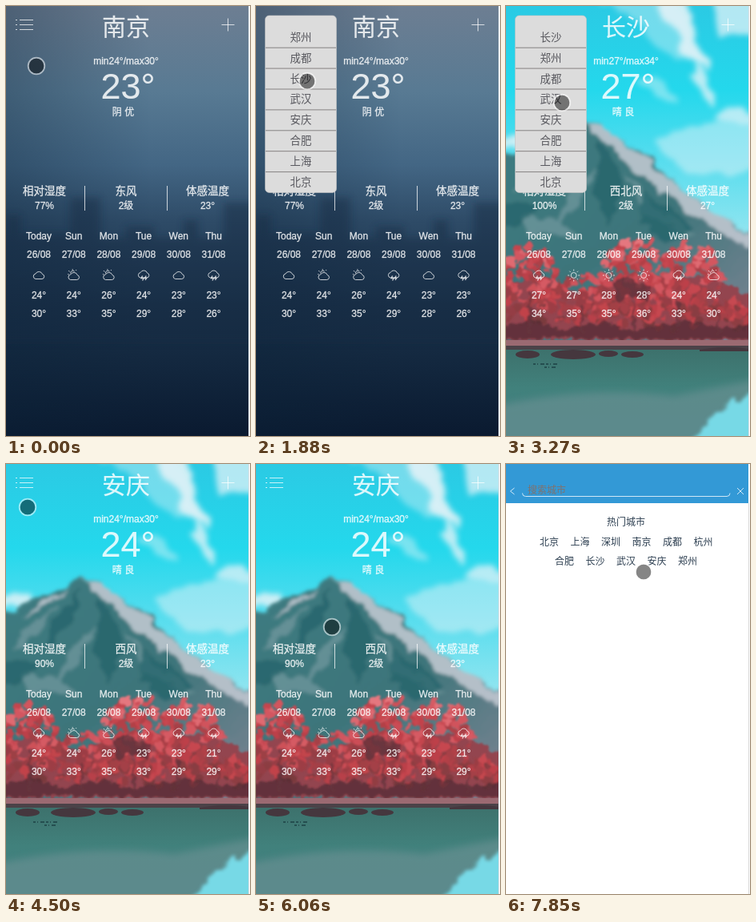
An HTML page that plays this animation: 305x538 px, repeating every 8000 ms.

```html
<!DOCTYPE html>
<html lang="zh">
<head>
<meta charset="utf-8">
<title>Weather</title>
<style>
html, body { margin: 0; width: 100%; height: 100%; overflow: hidden; background: #fff; }
svg { position: absolute; left: 0; top: 0; }
text { font-family: "Liberation Sans", "Noto Sans CJK SC", "Noto Sans CJK", sans-serif; text-anchor: middle; }
#ui text { fill: #fff; fill-opacity: .84; stroke: #fff; stroke-opacity: .6; stroke-width: .4px; }
#ui text.big { stroke-width: .2px; }
#ui path { fill: none; stroke: #fff; stroke-opacity: .75; }
#menu text { fill: #59595f; }
#search text { fill: #2c3e50; }
#search text.hint { fill: #80716c; text-anchor: start; }
#cursor { will-change: transform; }
</style>
</head>
<body>
<svg id="back" width="305" height="538" viewBox="0 0 305 538">
  <defs>
    <linearGradient id="dusk" x2="0" y2="1">
      <stop offset="0" stop-color="#6d7e92"/><stop offset=".2" stop-color="#587a93"/>
      <stop offset=".37" stop-color="#436684"/><stop offset=".5" stop-color="#2e4b67"/>
      <stop offset=".7" stop-color="#1a324a"/><stop offset="1" stop-color="#0a1a30"/>
    </linearGradient>
    <linearGradient id="shade" x2="1" y2="0">
      <stop offset="0" stop-color="#0b2238" stop-opacity=".32"/><stop offset=".6" stop-color="#0b2238" stop-opacity="0"/>
    </linearGradient>
    <linearGradient id="sky" x2="0" y2="1">
      <stop offset="0" stop-color="#2bcae4"/><stop offset=".35" stop-color="#24d8ec"/>
      <stop offset=".6" stop-color="#4fdcee"/><stop offset="1" stop-color="#9ae6f0"/>
    </linearGradient>
    <linearGradient id="slope" x2="1" y2="1">
      <stop offset="0" stop-color="#3f7c82"/><stop offset=".5" stop-color="#3c757a"/><stop offset="1" stop-color="#8a8798"/>
    </linearGradient>
    <linearGradient id="lake" x2="0" y2="1">
      <stop offset="0" stop-color="#3d716c"/><stop offset=".45" stop-color="#41817c"/><stop offset="1" stop-color="#427f82"/>
    </linearGradient>
    <linearGradient id="night" x2="0" y2="1">
      <stop offset="0" stop-color="#45508f"/><stop offset=".14" stop-color="#28285f"/>
      <stop offset=".34" stop-color="#2a2760"/><stop offset=".42" stop-color="#594a76"/>
      <stop offset=".52" stop-color="#2a2350"/><stop offset=".62" stop-color="#4c4474"/>
      <stop offset=".75" stop-color="#385a90"/><stop offset=".9" stop-color="#357a9c"/>
      <stop offset="1" stop-color="#58a7aa"/>
    </linearGradient>
    <filter id="soft" x="-30%" y="-30%" width="160%" height="160%"><feGaussianBlur stdDeviation="5"/></filter>
    <filter id="rough" x="-20%" y="-20%" width="140%" height="140%">
      <feTurbulence type="fractalNoise" baseFrequency=".05" numOctaves="3" seed="4"/>
      <feDisplacementMap in="SourceGraphic" scale="18" xChannelSelector="R" yChannelSelector="G"/>
      <feGaussianBlur stdDeviation="2"/>
    </filter>
    <filter id="leafy" x="-20%" y="-20%" width="140%" height="140%">
      <feTurbulence type="fractalNoise" baseFrequency=".1" numOctaves="2" seed="2"/>
      <feDisplacementMap in="SourceGraphic" scale="12" xChannelSelector="R" yChannelSelector="G"/>
      <feGaussianBlur stdDeviation="1.2"/>
    </filter>
    <filter id="wisp" x="-30%" y="-30%" width="160%" height="160%">
      <feTurbulence type="fractalNoise" baseFrequency=".03" numOctaves="3" seed="9"/>
      <feDisplacementMap in="SourceGraphic" scale="26" xChannelSelector="R" yChannelSelector="G"/>
      <feGaussianBlur stdDeviation="3.5"/>
    </filter>
    <filter id="cloudy" x="-30%" y="-30%" width="160%" height="160%">
      <feTurbulence type="fractalNoise" baseFrequency=".018 .03" numOctaves="3" seed="9"/>
      <feDisplacementMap in="SourceGraphic" scale="50" xChannelSelector="R" yChannelSelector="G"/>
      <feGaussianBlur stdDeviation="4"/>
    </filter>
    <clipPath id="page"><path d="M0 0H303V538H0z"/></clipPath>
  </defs>
  <g clip-path="url(#page)">
    <g id="city">
      <path fill="url(#dusk)" d="M0 0H303V538H0z"/>
      <path fill="url(#shade)" d="M0 0H303V538H0z"/>
      <path filter="url(#soft)" fill="#132b43" opacity=".45" d="M-20 285H0V262H18V284H80V240H118V290H150V276H185V290H222V268H240V290H272V246H325V420H-20z"/>
    </g>
    <g id="hill">
      <path fill="url(#sky)" d="M0 0H303V300H0z"/>
      <g fill="#e2f2f7" filter="url(#wisp)">
        <path opacity=".4" d="M110 -20H200L250 70L205 60z"/>
        <path opacity=".9" d="M180 -20H215L235 30L258 78L232 66L205 30z"/>
        <path opacity=".75" d="M250 -20H330V55L290 30L268 42z"/>
        <ellipse cx="246" cy="97" rx="8" ry="28" opacity=".8" transform="rotate(-18 246 97)"/>
        <ellipse cx="190" cy="104" rx="28" ry="9" opacity=".45" transform="rotate(32 190 104)"/>
        <ellipse cx="290" cy="140" rx="30" ry="8" opacity=".75"/>
        <path opacity=".5" d="M190 170Q220 140 330 148V208H225z"/>
        <ellipse cx="8" cy="172" rx="34" ry="7" opacity=".85"/>
      </g>
      <g filter="url(#rough)">
        <path fill="url(#slope)" d="M-30 196L15 180L60 160L95 144L118 150L150 173L185 197L222 230L262 262L340 310V430H-30z"/>
        <g fill="#c6ccd5" opacity=".85">
          <path d="M95 146L122 152L160 182L200 212L245 250L310 294L300 302L235 262L190 226L150 196L125 170z"/>
          <path d="M80 154L50 178L20 192L52 170z"/>
        </g>
        <g fill="#7fa0a6" opacity=".6">
          <path d="M66 176L42 210L8 236L24 208z"/>
          <path d="M108 205L92 245L58 282L76 238z"/>
          <path d="M150 205L185 250L240 290L170 262z"/>
          <path d="M20 262L70 270L90 292L30 285z"/>
        </g>
        <g fill="#23636a" opacity=".75">
          <path d="M92 160L86 195L45 238L58 196z"/>
          <path d="M118 168L150 218L130 275L108 232z"/>
          <path d="M-10 245L40 252L20 275H-20z"/>
          <path d="M170 228L235 280L200 295L165 270z"/>
        </g>
      </g>
      <path fill="#93454f" filter="url(#leafy)" d="M-30 360L40 335L90 360L150 335L260 340L330 375V418H-30z"/>
      <g id="trees" filter="url(#leafy)"></g>
      <path fill="url(#lake)" d="M0 429H303V538H0z"/>
      <path fill="#9b6a72" d="M0 418H303V426H0z"/>
      <path fill="#4b4248" d="M0 425H303V430H0z"/>
      <g fill="#45373e">
        <ellipse cx="27" cy="436" rx="15" ry="5"/><ellipse cx="84" cy="436" rx="28" ry="6"/>
        <ellipse cx="128" cy="435" rx="12" ry="4"/><ellipse cx="158" cy="436" rx="14" ry="4"/>
        <path d="M242 430Q275 424 303 429V432H242z"/>
      </g>
      <path fill="#6e9294" opacity=".6" filter="url(#soft)" d="M-10 500Q100 475 210 488L325 465V500L230 545H-10z"/>
      <path fill="#77d9e6" filter="url(#rough)" d="M228 550Q255 505 325 474V550z"/>
      <path stroke="#14343a" stroke-width="1.500" stroke-dasharray="3 2 1 3 5 2" d="M34 448H66M48 452H64" opacity=".8"/>
    </g>
    <g id="sunset">
      <path fill="url(#night)" d="M0 0H303V538H0z"/>
      <g filter="url(#cloudy)">
        <path fill="#7b9ab2" opacity=".7" d="M-20 -20H60L45 15L-20 22z"/>
        <path fill="#d5c8a4" d="M190 -20H330V85L300 62L270 28L225 28z"/>
        <path fill="#8a7f99" opacity=".65" d="M95 -10H200L235 38L150 22z"/>
        <path fill="#201f55" opacity=".85" d="M-20 75Q110 45 190 70T330 110V180Q160 190 -20 165z"/>
        <path fill="#8f6276" opacity=".8" d="M50 222Q150 196 330 196V226L120 240z"/>
        <path fill="#e9c173" d="M140 232Q210 206 330 216V262H190z"/>
        <path fill="#d68e59" opacity=".8" d="M130 200L190 188L300 202L200 212z"/>
      </g>
      <path fill="#2d2450" opacity=".93" d="M0 245H28V236H50V244H82V222H90V216H97V222H108V240H113V222H150V238H170V247H188V257H208V250H216V262H242V254H250V264H260V256H276V266H303V290H0z"/>
      <g filter="url(#cloudy)">
        <path fill="#f0cd7c" d="M190 312Q250 293 330 304V362Q250 370 180 352z"/>
        <path fill="#cf956f" opacity=".65" d="M100 325L210 310V390L120 372z"/>
        <path fill="#28214f" opacity=".65" d="M70 285H160L148 375H92z"/>
        <path fill="#85809f" opacity=".6" d="M150 375H330V408H140z"/>
        <path fill="#24477e" opacity=".6" d="M-20 390L130 400L330 425V455L90 440L-20 455z"/>
        <path fill="#70afb5" opacity=".7" d="M-20 508L100 470L240 462L180 500L60 550H-20z"/>
        <ellipse cx="160" cy="487" rx="32" ry="9" fill="#a9c9b6" opacity=".75"/>
        <ellipse cx="286" cy="515" rx="42" ry="22" fill="#d3d6b0" opacity=".8"/>
      </g>
      <path fill="#72796f" d="M0 514H22L31 519L48 518L51 524L30 527L18 525H0z"/>
    </g>
  </g>
  <path fill="#d8dfe3" d="M303 0H304V538H303z"/>
</svg>

<svg id="ui" width="305" height="538" viewBox="0 0 305 538">
  <defs>
    <path id="cloud" d="M-4 4.500H4A3 3 0 0 0 4.500 -1.400A4.600 4.600 0 0 0 -4 -2A3.300 3.300 0 0 0 -4 4.500z"/>
    <g id="c"><use href="#cloud"/></g>
    <g id="p"><use href="#cloud" y="1"/><path d="M-4-2.500A3 3 0 0 1 1-5M-6-1L-7.500-1.500M-5-4.500L-6.500-6M-1.500-6.500V-8M2.500-6L3.500-7"/></g>
    <g id="r"><use href="#cloud" y="-1.500"/><path stroke-width="1.400" d="M-1.500 .5L-3 3.500H0L-1.500 6.500M3 .5L1.500 3.500H3.500L2 6"/></g>
    <g id="s"><circle r="3.500" fill="none" stroke="#fff" stroke-opacity=".75"/><path d="M0-5.500V-7.500M0 5.500V7.500M5.500 0H7.500M-5.500 0H-7.500M4-4L5.300-5.300M-4-4L-5.300-5.300M4 4L5.300 5.300M-4 4L-5.300 5.300"/></g>
  </defs>
  <path d="M12 17.500H14M17 17.500H34M12 23.500H14M17 23.500H34M12 29.500H14M17 29.500H34M269.500 23.500H285.500M277.500 15.500V31.500M98.500 225V256M201.500 225V256"/>
  <g id="info"></g>
</svg>

<svg id="menu" width="305" height="538" viewBox="0 0 305 538">
  <rect x="11.500" y="12" width="89" height="221.500" rx="5" fill="#dcdcdc" stroke="#c4c4c4" stroke-width=".6"/>
  <path id="rules" stroke="#858282"/>
  <g id="list"></g>
</svg>

<svg id="search" width="305" height="538" viewBox="0 0 305 538">
  <path fill="#fff" d="M0 0H305V538H0z"/>
  <path fill="#3399d6" d="M0 0H303V49H0z"/>
  <path fill="#d8d8d8" d="M303 49H304V538H303z"/>
  <path fill="none" stroke="#cfe8f7" d="M10.500 30L5.500 34L10.500 38M289 30L297 38M297 30L289 38M20.500 36.500Q20.500 40.500 24.500 40.500H276Q280 40.500 280 36.500"/>
  <g id="cities"></g>
</svg>

<svg id="cursor" width="24" height="24" viewBox="-12 -12 24 24">
  <circle r="9.500" fill="#000" fill-opacity=".48"/>
  <circle r="10.300" fill="none" stroke="#fff" stroke-opacity=".55" stroke-width="1.800"/>
</svg>

<script>
const $ = id => document.getElementById(id);
const label = (x, mid, s, size = 12, cls = '') =>
  `<text x="${x}" y="${mid + size * .365}" font-size="${size}" class="${cls}">${s}</text>`;
const show = (id, on) => $(id).style.display = on ? '' : 'none';

const days = ['Today', 'Sun', 'Mon', 'Tue', 'Wen', 'Thu'];
const reports = {
  南京: { bg: 'city', range: [24, 30], now: 23, sky: '阴 优', wet: 77, wind: '东风', force: 2, feel: 23,
    icons: 'cpprcr', low: [24, 24, 26, 24, 23, 23], high: [30, 33, 35, 29, 28, 26] },
  长沙: { bg: 'hill', range: [27, 34], now: 27, sky: '晴 良', wet: 100, wind: '西北风', force: 2, feel: 27,
    icons: 'rsssrp', low: [27, 27, 28, 28, 24, 24], high: [34, 35, 35, 36, 33, 30] },
  安庆: { bg: 'hill', range: [24, 30], now: 24, sky: '晴 良', wet: 90, wind: '西风', force: 2, feel: 23,
    icons: 'rpprrr', low: [24, 24, 26, 23, 23, 21], high: [30, 33, 35, 33, 29, 29] },
  上海: { bg: 'sunset', range: [27, 31], now: 28, sky: '多云 优', wet: 69, wind: '东南风', force: 1, feel: 27,
    icons: 'rcrrcs', low: [27, 27, 28, 26, 26, 24], high: [31, 33, 35, 33, 31, 30] }
};

function infoMarkup(name) {
  const r = reports[name];
  let out = label(150, 26.500, name, 30, 'big')
    + label(150, 69, `min${r.range[0]}°/max${r.range[1]}°`)
    + label(152.500, 100, r.now + '°', 45, 'big') + label(146.500, 132.500, r.sky)
    + label(48, 231, '相对湿度', 13.500) + label(48, 249.500, r.wet + '%')
    + label(150, 231, r.wind, 13.500) + label(150, 249.500, r.force + '级')
    + label(252, 231, '体感温度', 13.500) + label(252, 249.500, r.feel + '°');
  days.forEach((day, i) => {
    const x = 41 + i * 43.700;
    out += label(x, 287.500, day) + label(x, 310.500, `${26 + i}/08`)
      + `<use href="#${r.icons[i]}" x="${x}" y="337"/>`
      + label(x, 362, r.low[i] + '°') + label(x, 385, r.high[i] + '°');
  });
  return out;
}

// Seeded foliage, darker towards the ground
let seed = 7;
const rnd = () => (seed = seed * 16807 % 2147483647) / 2147483647;
let leaves = '';
for (const [cx, cy, rx, ry, n] of [[150, 388, 165, 18, 110], [30, 346, 40, 46, 120], [165, 342, 46, 50, 130], [232, 345, 38, 50, 120], [105, 365, 35, 32, 60], [288, 386, 24, 20, 40]])
  for (let i = 0; i < n; i++) {
    const a = rnd() * 6.283, d = Math.sqrt(rnd());
    const y = cy + ry * d * Math.sin(a);
    const light = 70 - (y - 290) * .17 - rnd() * 18;
    leaves += `<circle cx="${cx + rx * d * Math.cos(a)}" cy="${y}" r="${2 + rnd() * 4.500}" fill="hsl(356 ${light}% ${light}%)"/>`;
  }
$('trees').innerHTML = leaves
  + '<path fill="#5c313a" opacity=".75" d="M132 348L152 338L182 352L176 370L152 362L140 374z"/>'
  + '<path fill="#4f2c34" opacity=".7" d="M-10 402L30 392L70 404L120 396L165 405L220 394L265 402L310 398V416H-10z"/>'
  + '<path stroke="#65343d" stroke-width="3" opacity=".8" d="M30 355V410M215 365V405M160 370V408M265 375V410M95 375V408"/>';

let rules = '';
for (let i = 0; i < 7; i++) rules += `M12 ${52.200 + i * 25.900}H100`;
$('rules').setAttribute('d', rules);

const row = (names, x, y) => names.split(' ').map((s, i) => label(x + i * 38.500, y, s)).join('');
$('cities').innerHTML = label(27, 33, '搜索城市', 12, 'hint') + label(150, 73, '热门城市')
  + row('北京 上海 深圳 南京 成都 杭州', 54, 98) + row('合肥 长沙 武汉 安庆 郑州', 73, 122);

// Timeline in ms
const picks = [[0, '南京'], [2430, '长沙'], [4080, '安庆'], [6290, '上海']];
const menus = [
  [700, 2180, '郑州 成都 长沙 武汉 安庆 合肥 上海 北京'],
  [2920, 3850, '长沙 郑州 成都 武汉 安庆 合肥 上海 北京'],
  [5000, 5910, '安庆 长沙 郑州 成都 武汉 合肥 上海 北京']
];
const path = [
  [0, 38, 75], [80, 38, 75], [520, 24, 26], [720, 24, 26], [1010, 40, 52], [1180, 40, 52], [1800, 64, 94], [2430, 64, 94],
  [2780, 24, 26], [2930, 24, 26], [3270, 70, 121], [3500, 70, 121], [3720, 64, 144], [4080, 64, 144], [4500, 27, 54],
  [4670, 27, 54], [4880, 24, 26], [5020, 24, 26], [5600, 95, 204], [6290, 95, 204], [6750, 282, 29], [6980, 282, 29],
  [6980, 279, 24], [7380, 279, 24], [7850, 172, 135], [8000, 172, 135]
];

let city, list;
function draw(t) {
  const name = picks.filter(p => p[0] <= t).pop()[1];
  if (name !== city) {
    city = name;
    $('info').innerHTML = infoMarkup(name);
    for (const id of ['city', 'hill', 'sunset']) show(id, id === reports[name].bg);
  }
  const open = menus.find(m => t >= m[0] && t < m[1]);
  show('menu', open);
  if (open && open[2] !== list) {
    list = open[2];
    $('list').innerHTML = list.split(' ').map((s, i) => label(56, 39 + i * 25.850, s, 13.500)).join('');
  }
  show('search', t >= 7380);
  const i = path.findIndex(p => p[0] > t), [t0, x0, y0] = path[i - 1], [t1, x1, y1] = path[i];
  const k = (t - t0) / (t1 - t0);
  $('cursor').style.transform = `translate(${x0 + (x1 - x0) * k - 12}px, ${y0 + (y1 - y0) * k - 12}px)`;
}
function tick() {
  draw(performance.now() % 8000);
  requestAnimationFrame(tick);
}
tick();
</script>
</body>
</html>
```
